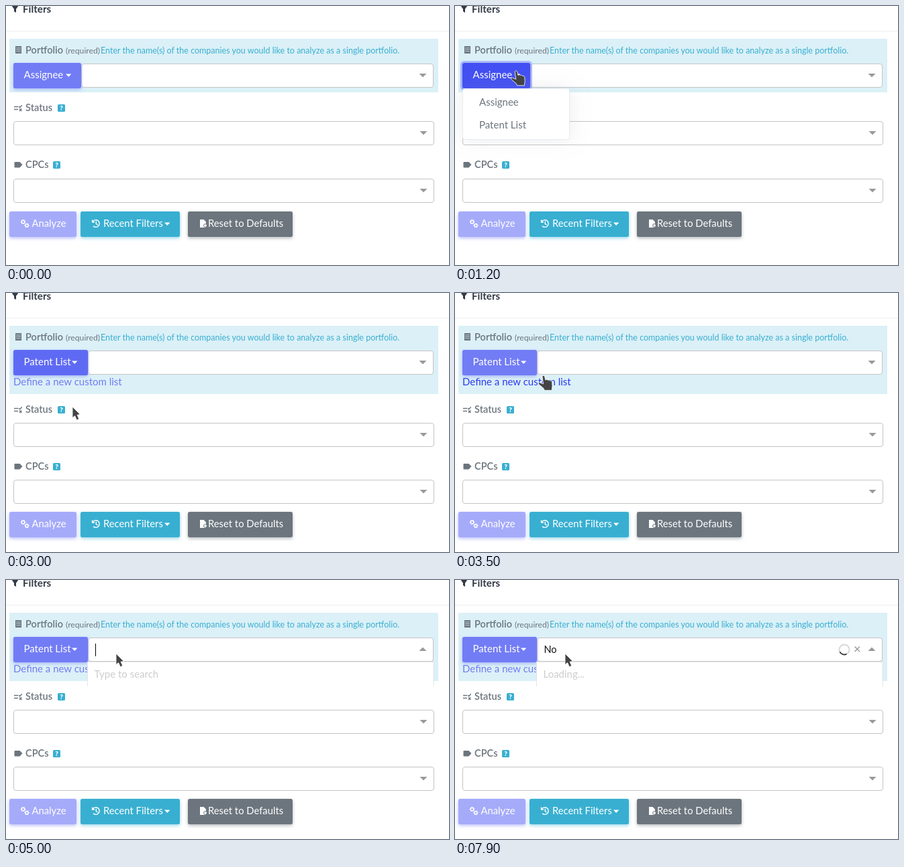
These frames come from a looping animation (660x387 px, 8000 ms). An HTML page:

```html
<!DOCTYPE html>
<html lang="en">
<head>
<meta charset="utf-8">
<title>Filters</title>
<style>
  html, body { margin: 0; width: 100%; height: 100%; overflow: hidden; background: #fff; }
  svg { display: block; width: 660px; height: 387px; font: 15px Lato, "Open Sans", sans-serif; }
  text { white-space: pre; }
  .label { font-size: 14.6px; font-weight: 600; fill: #6c757d; }
  .btn { font-size: 14.8px; fill: #fff; }
  .field { fill: #fff; stroke: #c4c4c4; }
  .tri { fill: #999; }
  .line { fill: none; stroke-width: 1.4; }
</style>
</head>
<body>
<svg id="stage" viewBox="0 0 660 387"></svg>
<script>
const LOOP = 8000, STEP = 100;
const PRIMARY = [114, 124, 245], HOVER = [78, 91, 242], ACTIVE = [66, 80, 242];
const GRAY = '#6c757d', INFO = '#39afd1';

const rect = (x, y, w, h, attrs = '') =>
  `<rect x="${x}" y="${y}" width="${w}" height="${h}" ${attrs}/>`;
const text = (x, y, str, attrs = '') => `<text x="${x}" y="${y}" ${attrs}>${str}</text>`;
const path = (d, attrs = '') => `<path d="${d}" ${attrs}/>`;
const group = (id, body, attrs = '') => `<g id="${id}" ${attrs}>${body}</g>`;
const down = (x, y, w, h, attrs) => path(`M${x} ${y}h${w}l${-w / 2} ${h}z`, attrs);
const field = (x, y, w) =>
  rect(x + .5, y + .5, w, 35, 'rx="3.5" class="field"') + down(616.5, y + 15, 11, 5.5, 'class="tri"');
const help = (x, y) => rect(x, y, 11, 11, `rx="1.5" fill="${INFO}"`) +
  text(x + 5.5, y + 9.2, '?', 'font-size="10" font-weight="900" fill="#fff" text-anchor="middle"');
const button = (x, w, color, shadow) =>
  rect(x, 307, w, 38, `rx="2.5" fill="${color}" filter="url(#${shadow})"`);
const shadow = (id, color) =>
  `<filter id="${id}" x="-20%" y="-40%" width="140%" height="200%">
    <feDropShadow dx="0" dy="2" stdDeviation="2.4" flood-color="${color}" flood-opacity=".5"/></filter>`;

function gear(cx, cy, r) {
  let teeth = '';
  for (let i = 0; i < 6; i++) {
    const a = i * Math.PI / 3, c = Math.cos(a), s = Math.sin(a);
    teeth += `M${cx + c * r} ${cy + s * r}L${cx + c * (r + 1.4)} ${cy + s * (r + 1.4)}`;
  }
  return `<circle cx="${cx}" cy="${cy}" r="${r}" class="line" stroke="#fff"/>` +
    path(teeth, 'class="line" stroke="#fff"');
}

function building() {
  let windows = '';
  for (let i = 0; i < 9; i++) windows += rect(15.6 + i % 3 * 2.3, 62 + (i / 3 | 0) * 2.6, 1.2, 1.4, 'fill="#dbf0f7"');
  return rect(14, 60, 9, 11, `fill="${GRAY}"`) + windows;
}

const header = path('M8 -1H19L15 4.5V10L12 8V4.5Z', 'fill="#313a46"') +
  text(25, 10, 'Filters', 'font-size="15.2" font-weight="700" fill="#313a46"') +
  rect(0, 37, 660, 1, 'fill="#eceff3"');

const portfolio = rect(5, 49, 639, 80, 'id="panel" fill="#dbf0f7"') + building() +
  text(29, 71, 'Portfolio', 'class="label"') +
  text(89, 71, '(required)', `font-size="12.2" fill="${GRAY}"`) +
  text(141, 71, 'Enter the name(s) of the companies you would like to analyze as a single portfolio.',
    `font-size="12.5" fill="${INFO}"`) +
  text(11, 138, 'Define a new custom list', 'id="link"') +
  rect(112.5, 86.5, 524, 35, 'id="search" rx="3.5" class="field"') +
  path('', 'id="searchArrow" class="tri"') +
  rect(9.5, 83.5, 104, 41, 'id="ring" rx="4" fill="none" stroke="#8790f7" stroke-opacity=".55" stroke-width="3"') +
  rect(11, 85, 101, 38, 'id="kind" rx="2.5" filter="url(#blueShadow)"') +
  text(26.5, 108, '', 'id="kindText" fill="#fff"') +
  down(0, 101.5, 8.4, 4.4, 'id="kindArrow" fill="#fff"');

const status = path('M12 150.5h6M12 154.5h6M19 150l1.7 1.7l3 -3.4M20 153.6l3.4 3.4M23.4 153.6l-3.4 3.4',
    `class="line" stroke="${GRAY}"`) +
  text(29, 157, 'Status', 'class="label"') + help(77, 147) + field(11, 172, 626);

const cpcLabel = path('M13.5 233H20.5L24.5 237L20.5 241.5H13.5Q12.5 241.5 12.5 240.5V234Q12.5 233 13.5 233Z',
    `fill="${GRAY}"`) +
  text(29, 242, 'CPCs', 'class="label"') + help(70, 232);

const buttons = button(5, 100, '#a5abf9', 'blueShadow') + gear(25.5, 322.5, 2.3) + gear(31, 327.8, 2.1) +
  text(38.5, 330, 'Analyze', 'class="btn"') +
  button(111, 148, INFO, 'infoShadow') +
  path('M129.2 322.5A5.3 5.3 0 1 1 130 328.7M128.6 319.5V323H132M134.3 321.8V325.5L136.8 327', 'class="line" stroke="#fff"') +
  text(145, 330, 'Recent Filters', 'class="btn"') + down(236, 323.5, 8.4, 4.4, 'fill="#fff"') +
  button(271, 156, GRAY, 'grayShadow') +
  path('M289 319H294.5L298 322.5V331H289Z', 'fill="#fff"') +
  `<circle cx="297" cy="328" r="2.4" fill="#fff" stroke="${GRAY}"/>` +
  text(301, 330, 'Reset to Defaults', 'class="btn"');

const kindMenu = rect(11.5, 123.5, 159, 76, 'rx="3" fill="#fff" stroke="#e7ebf0" filter="url(#menuShadow)"') +
  rect(12, 128, 158, 33.5, 'id="mark" fill="#e8ebee"') +
  text(36, 149, 'Assignee', 'id="item0"') + text(36, 183, 'Patent List', 'id="item1"');

const results = rect(122, 122, 515, 37, 'fill="#fff"') +
  path('M121.5 122V159M637 122V159', 'stroke="#e2e4e6" fill="none"') +
  path('M122 122H637', 'stroke="#ccc" fill="none"') +
  text(131.5, 146, '', 'id="hint" fill="#ccc"') +
  text(132.5, 109, '', 'id="typed" font-size="14.5" fill="#111"') +
  rect(133, 95, 1, 19, 'id="caret" fill="#000"') +
  group('busy', `<circle cx="580" cy="104" r="7.5" fill="none" stroke="#d9d9d9" stroke-width="2"/>` +
    path('M574.7 109.3A7.5 7.5 0 0 1 574.7 98.7', 'id="spin" fill="none" stroke="#424242" stroke-width="2"') +
    path('M595.6 99.6l7.4 7.4M603 99.6l-7.4 7.4', 'class="line" stroke="#999"'));

const pointer = 'fill="#444" stroke="#fff" stroke-width=".8" stroke-linejoin="round"';
const cursor = path('M0 0V16.4L3.6 13.6L6.4 19.8L9.8 18.2L7.1 12.2L11.4 11.4Z', `id="arrow" ${pointer}`) +
  path('M-1.8 1.5C-2 -.6 1.2 -.8 1.8 1.2L3 6.4C4.5 5.4 6 5.6 6.6 6.8C8 6 9.4 6.5 9.9 7.6' +
    'C11.5 7.2 12.6 8 12.8 9.6L13.2 15.2L12.4 21.8H1.6L0 18.6L-6.8 13C-8.4 11.6 -7 9.8 -5.2 10.4L-.2 12.4Z',
    `id="hand" ${pointer}`);

document.getElementById('stage').innerHTML =
  `<defs>${shadow('blueShadow', '#727cf5')}${shadow('infoShadow', INFO)}${shadow('grayShadow', GRAY)}
    <filter id="menuShadow" x="-40%" y="-70%" width="180%" height="240%">
      <feDropShadow dx="0" dy="0" stdDeviation="15" flood-color="#9aa1ab" flood-opacity=".2"/></filter></defs>` +
  header + portfolio + group('status', status) + group('cpcLabel', cpcLabel) +
  group('cpcField', field(11, 258, 626)) + group('buttons', buttons) +
  group('kindMenu', kindMenu) + group('results', results) + group('cursor', cursor);

const el = {};
document.querySelectorAll('[id]').forEach(node => el[node.id] = node);

// Rows are [time, ...values], read with linear interpolation.
const route = [
  [0, 113, -14], [400, 108, 40], [700, 93, 92], [800, 91, 97],
  [1500, 91, 97], [1800, 98, 154], [2000, 98, 154], [2200, 98, 168],
  [3000, 99, 170], [3100, 99, 170], [3600, 140, 112], [3700, 140, 112], [4200, 149, 127],
  [4300, 149, 127], [4500, 183, 82], [4700, 164, 110]
];
const kindColor = [
  [600, ...PRIMARY], [800, ...HOVER], [900, ...HOVER], [1000, ...ACTIVE],
  [2700, ...ACTIVE], [3200, ...PRIMARY]
];
const caretTimes = [[5000, 5500], [6100, 7000], [6900, 7400]];

function sample(rows, t) {
  const i = rows.findIndex(row => row[0] > t);
  if (i === 0) return rows[0].slice(1);
  if (i < 0) return rows[rows.length - 1].slice(1);
  const a = rows[i - 1], b = rows[i], k = (t - a[0]) / (b[0] - a[0]);
  return a.slice(1).map((v, n) => v + (b[n + 1] - v) * k);
}

const set = (node, attrs) => { for (const key in attrs) node.setAttribute(key, attrs[key]); };
const show = (node, on) => { node.style.display = on ? '' : 'none'; };
const shift = (node, y) => node.setAttribute('transform', `translate(0 ${y})`);

function render(t) {
  const [x, y] = sample(route, t);
  const listMode = t >= 2800, open = t >= 5000, loading = t >= 6500;
  const menuOpen = t >= 1100 && !listMode;
  const kindWidth = listMode ? 111 : 101;

  set(el.panel, { height: listMode ? 102 : 80 });
  shift(el.status, listMode ? 22 : 0);
  shift(el.cpcLabel, listMode ? 22 : 0);
  shift(el.cpcField, listMode ? 21 : 0);
  shift(el.buttons, listMode ? 20 : 0);

  set(el.kind, { width: kindWidth, fill: `rgb(${sample(kindColor, t).map(Math.round)})` });
  set(el.search, { x: kindWidth + 11.5, width: 625 - kindWidth - 0.5 + .5 - 0 });
  el.kindText.textContent = listMode ? 'Patent List' : 'Assignee';
  set(el.kindArrow, { transform: `translate(${listMode ? 98 : 89} 0)` });
  show(el.ring, t >= 1000 && !listMode);

  const onKind = x > 11 && x < 11 + kindWidth && y > 85 && y < 123;
  const onLink = listMode && x > 11 && x < 169 && y > 123 && y < 143;
  show(el.link, listMode);
  set(el.link, { fill: onLink ? '#2b3af0' : '#727cf5' });

  const hovered = !menuOpen || y < 128 ? -1 : y < 162 ? 0 : 1;
  show(el.kindMenu, menuOpen);
  show(el.mark, hovered >= 0);
  set(el.mark, { y: hovered === 1 ? 162 : 128 });
  [el.item0, el.item1].forEach((item, i) => set(item, { fill: i === hovered ? '#272e37' : GRAY }));

  set(el.searchArrow, { d: open ? 'M615.5 106h11l-5.5 -5.5z' : 'M615.5 101h11l-5.5 5.5z' });
  show(el.results, open);
  show(el.busy, loading);
  el.hint.textContent = loading ? 'Loading...' : 'Type to search';
  el.typed.textContent = t >= 6900 ? 'No' : loading ? 'N' : '';
  show(el.caret, caretTimes.some(([from, to]) => t >= from && t < to));
  set(el.caret, { x: t >= 6900 ? 151 : loading ? 143 : 133 });
  set(el.spin, { transform: `rotate(${(t - 6460) / 800 * 360} 580 104)` });

  const hand = onKind || hovered >= 0 || onLink;
  show(el.cursor, t >= 100);
  set(el.cursor, { transform: `translate(${x.toFixed(1)} ${y.toFixed(1)})` });
  show(el.hand, hand);
  show(el.arrow, !hand);
}

function frame() {
  render(Math.floor(performance.now() % LOOP / STEP) * STEP);
  requestAnimationFrame(frame);
}
frame();
</script>
</body>
</html>
```
